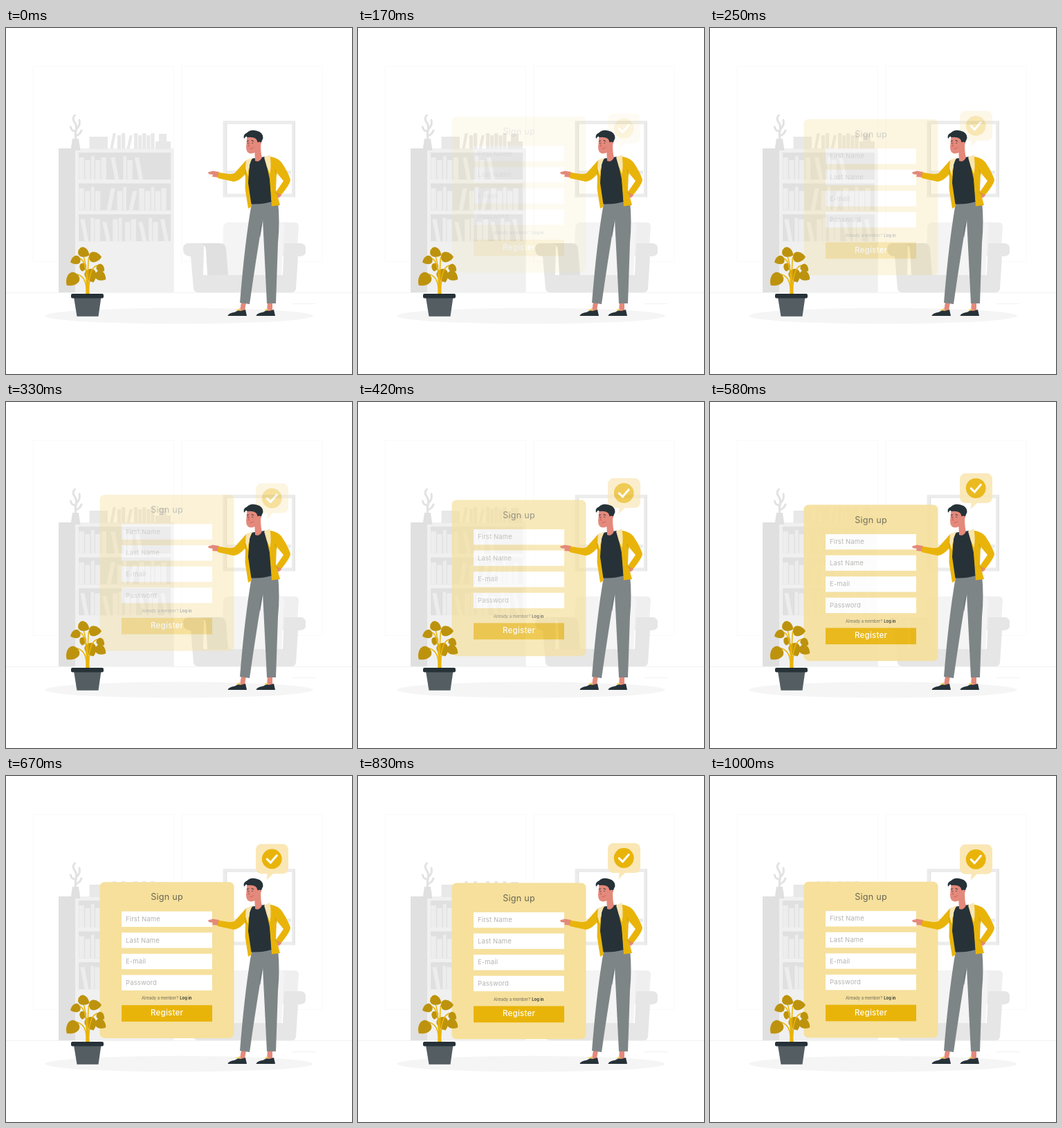
Write an HTML page that moves like this. It is 500 px wide and 500 px high and loops after 1040 ms.

```html
<!DOCTYPE html>
<html lang="en">
<head>
<meta charset="utf-8">
<title>Sign up</title>
<style>
html, body { margin: 0; width: 100%; height: 100%; overflow: hidden; background: #fff; }
svg { display: block; width: 100vw; height: 100vh; }
text { font-family: Montserrat, Inter, sans-serif; }
.label { font-size: 9.5px; letter-spacing: .12px; fill: #b3b3b1; }
.small { font-size: 5.8px; fill: #6d6a58; }
.bold { font-weight: 700; fill: #3e4238; }
.head { font-size: 12.6px; letter-spacing: .25px; fill: #696651; text-anchor: middle; }
.send { font-size: 11.5px; letter-spacing: .25px; fill: #fff; text-anchor: middle; font-weight: 500; }
.skin { fill: #e4897b; }
.dark { fill: #263238; }
.gold { fill: #e9b40a; }
.line { fill: none; stroke-linecap: round; stroke-linejoin: round; }
</style>
</head>
<body>
<svg viewBox="0 0 500 500">
  <g class="line" stroke="#f9f9f9">
    <path d="M39.500 55.500h203v282h-203zM254.500 55.500h203v282h-203z"/>
    <path d="M0 382.500H500M414 398.500h33" stroke="#f2f2f2"/>
  </g>

  <g id="shelf">
    <path fill="#e0e0e0" d="M76 174h24v208h-24z"/>
    <path fill="#f0f0f0" d="M100 174h142.500v208H100z"/>
    <path fill="#e0e0e0" d="M96 160h9l2.500 17h-14z"/>
    <path class="line" stroke="#e2e2e2" stroke-width="3"
      d="M100.500 161V149Q94 149 93.500 143M100.500 156Q107 154 109 148M101 150Q103 141 99 136T99.500 126M102 146Q108 140 106 133"/>
    <path fill="#e8e8e8" d="M120.500 157h26.500v18h-26.500zM216 164h22v11h-22zM221 153h11v11h-11z"/>
  </g>

  <g fill="none" stroke="#ececec" stroke-width="5">
    <path d="M316 136.500H415.500V242H316zM319 208.500H412"/>
    <path d="M318.500 138V240M417 135V244" stroke="#e2e2e2" stroke-width="1.500"/>
  </g>

  <g id="sofa">
    <path fill="#efefef" d="M392 281H417Q423 281 423 287L420 330H390z"/>
    <path fill="#f4f4f4" d="M322 281H395Q402 281 402 288L398 358H312L314 289Q314 281 322 281z"/>
    <path fill="#e6e6e6" d="M285 357H400L402 311H425Q433 311 433 319V324Q433 330 422 330L419 377Q418 382 413 382H278Q272 382 271 377L267 330Q256 330 256 319Q256 311 264 311H286z"/>
    <path fill="#e0e0e0" d="M281 311H309Q317 311 318 319L321 357H291L289 321Q288 313 281 311z"/>
  </g>
  <ellipse cx="250" cy="416" rx="193.500" ry="11.500" fill="#f5f5f5"/>

  <g id="panel">
    <rect x="135.500" y="154.500" width="194" height="225.700" rx="7" fill="#f6e09c"/>
    <text class="head" x="232.600" y="180.800">Sign up</text>
    <g id="fields"></g>
    <text class="small" x="196" y="324.800">Already a member?</text>
    <text class="small bold" x="251.300" y="324.800">Log in</text>
    <rect class="gold" x="167" y="332.500" width="131" height="23.700"/>
    <text class="send" x="232.600" y="347.500">Register</text>
  </g>

  <g id="bubble" fill="#fae7b5">
    <rect x="361" y="97" width="47" height="43" rx="8"/>
    <path d="M378 138L376.500 149L387 139z"/>
    <circle class="gold" cx="384.200" cy="118.500" r="14.400"/>
    <path class="line" d="M377.300 118.800l5 5.200l9-10.500" stroke="#fff" stroke-width="3"/>
  </g>

  <g id="plant">
    <path fill="#545e62" d="M98 389H137.500L133.500 416.800H102.500z"/>
    <rect class="dark" x="94" y="384" width="47" height="6.500" rx="2"/>
  </g>

  <g id="person">
    <path class="skin" d="M340 396H347L345 409H338zM378 396H385V409H377z"/>
    <path fill="#f3cf55" d="M332 408L338 405L339 409zM373 408L378 405L379 409z"/>
    <g class="dark">
      <path id="shoe" d="M320.500 416Q321 412 331 410.500Q336 407 339 409L346 407L348 416z"/>
      <use href="#shoe" x="41"/>
    </g>
    <path fill="#7d8587" d="M355 253L393 250Q396 280 393 310L390 398H377L371 276Q361 335 352 399L338 397Q345 310 355 253z"/>
    <path fill="#6a7275" d="M371.500 275L367 303Q366 288 371.500 275z"/>

    <path class="skin" d="M308 208L299 206.500L292 208.500L293 211L299 212L298 215L308 216zM388 238L396 235L398 242Q394 247 388 246z"/>
    <path class="dark" d="M353 189L374 186L381 212L384 251Q366 256 350 254L350 215z"/>
    <path class="skin" d="M359 174L368 163Q368 182 370 187Q366 195 360 192z"/>
    <path class="gold" d="M347 191L331 209Q328 213 307 208.500L306 217L329 222Q336 222 346 211L345.500 232L350 261L355 258L350 224L352 190z"/>
    <path class="gold" d="M374 187L383 186Q393 188 398 194Q407 207 411 219Q411 225 398 241L390 237L401 221L391 209L390 234L396 256L384 257.500L381 218z"/>
    <path class="line" stroke="#cf9e08" d="M389 205L391 212M388 237L394 241M346 200V213"/>
    <path fill="#f9e5b0" d="M347 191L357 187Q351 194 349.500 214L346 203zM373 187L381 183Q384 195 381.500 211Q376 200 373 187z"/>

    <path class="skin" d="M348.500 155L347 172Q347 181 354 181.500Q360 181 364 176L369 166L366 154z"/>
    <path class="dark" d="M344 160Q342 154 348 151.500Q353 146 362 148.500Q372 151 371.500 159L369 165L364 166L362 161Q358 157 349 158L347 156.500z"/>
    <circle class="skin" cx="366" cy="167" r="2.500"/>
    <path class="line" stroke="#263238" d="M348.500 163.500l2-.5M355 162.500l2.500 1M349.700 166v.6M356 166v.6"/>
    <path class="line" stroke="#b95d54" stroke-width=".8" d="M351.500 166L350 170.500L352 171M353 174.500Q356 175 358 172.500"/>
  </g>
</svg>
<script>
const $ = id => document.getElementById(id);
const add = (id, svg, where = "beforeend") => $(id).insertAdjacentHTML(where, svg);

// A row of books: w wide, n narrow, / and \ leaning, space a gap.
function bookRow(row, x, base, size, fill) {
  const step = { w: 8.7, n: 6, "/": 17, "\\": 17, " ": 3 };
  let d = "";
  [...row].forEach((kind, i) => {
    const lean = { "/": 6, "\\": -6 }[kind] || 0;
    const width = (lean ? 6 : step[kind] - 1.3) * size;
    const height = (kind === "n" ? 34 : i % 2 ? 28 : 32) * size;
    const left = x + (lean ? 5 - lean / 2 : 0) * size;
    if (kind !== " ")
      d += `M${left} ${base}h${width}l${lean * size} ${-height}h${-width}z`;
    x += step[kind] * size;
  });
  add("shelf", `<path fill="${fill}" d="${d}"/>`);
}
bookRow("/ww/wwwww", 149, 174.5, 0.7, "#e8e8e8");
["wwnww \\ nw\\", "wwnw  /wn/wwnww", "\\nw\\wn ww\\nw\\"].forEach((row, i) => {
  const top = 180 + i * 44.6;
  add("shelf", `<rect x="105" y="${top}" width="133" height="39" fill="#e0e0e0"/>`);
  bookRow(row, 105.5, top + 39, 1, "#ededed");
});

// Leaves hang on stems that rise from one root.
function leaf(x, y, angle, size) {
  add("plant", `<path class="line" stroke="#e9b40a" stroke-width="1.6"
      d="M${118 + (x - 118) / 8} 386Q118 ${y + 4} ${x} ${y}"/>
    <path fill="#bd930d" transform="translate(${x} ${y}) rotate(${angle}) scale(${size})"
      d="M0 0C0 -.6 .7 -.5 1 0C.7 .5 0 .6 0 0"/>`, "afterbegin");
}
leaf(105, 321, 25, 17);
leaf(107, 333, 158, 15);
leaf(120, 331, 0, 18);
leaf(112, 340, 100, 12);
leaf(132, 343, 40, 13);
leaf(103, 356, 134, 22);
leaf(119, 349, 68, 20);
leaf(130, 354, 33, 17);

["First Name", "Last Name", "E-mail", "Password"].forEach((name, i) => {
  const y = 197 + i * 30.6;
  add("fields", `<rect x="167" y="${y}" width="131" height="22.3" fill="#fff"/>
    <text class="label" x="173" y="${y + 14.3}">${name}</text>`);
});

const FPS = 24, STEPS = 25, SLIDE = 0.77, FADE = 0.67, TRAVEL = 30;
const easeTo = (t, end) => (1 - Math.cos(Math.PI * Math.min(t / end, 1))) / 2;

function draw(now) {
  const step = Math.floor(now * FPS / 1000 + 0.01) % STEPS;
  const t = step / FPS;
  // Slide in, then begin to float back.
  const drift = 35 * Math.max(t - SLIDE, 0) ** 2;
  const shift = TRAVEL * (1 - easeTo(t, SLIDE)) + drift;
  const opacity = step < 2 ? 0 : easeTo(t, FADE);
  $("panel").setAttribute("transform", `translate(0 ${-shift})`);
  $("bubble").setAttribute("transform", `translate(0 ${shift})`);
  for (const id of ["panel", "bubble"]) $(id).setAttribute("opacity", opacity);
}

const start = performance.now();
function tick() {
  draw(performance.now() - start);
  requestAnimationFrame(tick);
}
tick();
</script>
</body>
</html>
```
